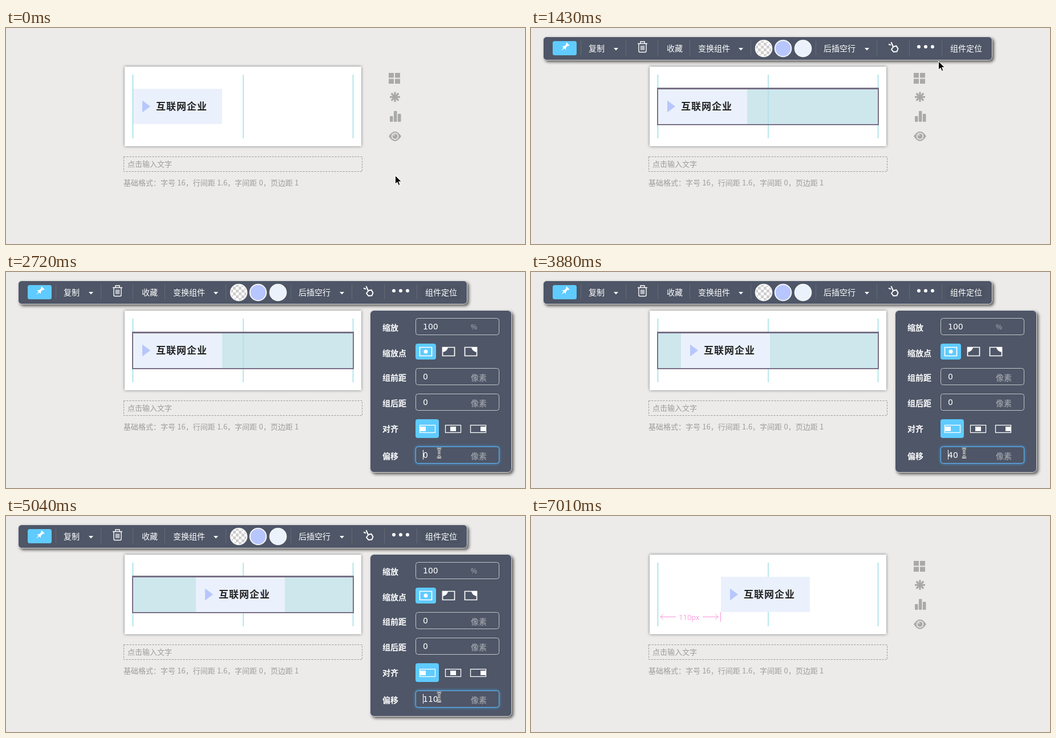
An HTML page that plays this animation: 910x380 px, repeating every 8 s.

```html
<!DOCTYPE html>
<html lang="zh-CN">
<head>
<meta charset="utf-8">
<title>组件定位</title>
<style>
@property --off { syntax: "<integer>"; inherits: true; initial-value: 0; }

html, body { margin: 0; width: 100%; height: 100%; overflow: hidden; background: #ecebe9; }
#stage { position: relative; width: 910px; height: 380px; overflow: hidden; animation: offset 8s step-end infinite; }
svg { position: absolute; left: 0; top: 0; }
text { font: 14px "Noto Sans CJK SC", "Noto Sans CJK", sans-serif; fill: #fff; }
.note text { font-size: 13px; fill: #9c9c9c; word-spacing: .4px; }
.title { font-size: 17px; font-weight: 700; letter-spacing: 1px; fill: #222; }
.labels text { font-weight: 700; }
.num, #value { font: 14px/20px "DejaVu Sans", sans-serif; color: #fff; }
.unit text { fill: #adb0b6; }
.dark { fill: #4e5667; stroke: #dcdcdc; filter: drop-shadow(3px 3px 2.5px rgba(0,0,0,.6)); }
.card { fill: #fff; filter: drop-shadow(0 0 2.5px rgba(50,50,60,.6)); }
.blue { fill: #5fcbff; }
.white { fill: #fff; }
.line { fill: none; stroke: #fff; }
.pink { fill: none; stroke: #f98fd6; }
.pink text { font: 300 13.5px Roboto, sans-serif; fill: #f77fd0; stroke: none; }

/* step-end keeps every change hard */
.bar, .panel, .hover, .select, .focus, .caret, .after, #value,
.cursor, .arrow, .hand, .beam, .locate { animation: 8s step-end infinite; }
.part { transform: translateX(calc(var(--off) * 1px)); }
#value { position: absolute; left: 731px; top: 312px; counter-reset: off var(--off); animation-name: panel; }
#value::before { content: counter(off); }
.bar, .select { animation-name: bar; }
.hover { animation-name: hover; }
.panel { animation-name: panel; }
.focus { animation-name: focus; filter: drop-shadow(0 0 2.5px #4aa8f0); }
.caret { animation-name: caret; }
.after { animation-name: after; }
.locate { animation-name: locate; }
.cursor { animation-name: move; }
.arrow { animation-name: arrow; }
.hand { animation-name: hand; }
.beam { animation-name: beam; }

@keyframes offset {
  0% { --off: 0; } 36.25% { --off: 10; } 41.875% { --off: 20; } 48.5% { --off: 40; }
  49.625% { --off: 50; } 50.75% { --off: 60; } 51.875% { --off: 70; } 52.875% { --off: 80; }
  57.375% { --off: 90; } 59.625% { --off: 100; } 63%, 100% { --off: 110; }
}
@keyframes bar { 0%, 87.625%, 100% { opacity: 0; } 15.625% { opacity: 1; } }
@keyframes hover { 0%, 87.625%, 100% { opacity: 0; } 10% { opacity: 1; } }
@keyframes panel { 0%, 87.625%, 100% { opacity: 0; } 21.125% { opacity: 1; } }
@keyframes focus { 0%, 100% { opacity: 0; } 32.875% { opacity: 1; } }
@keyframes caret { 0%, 36.25%, 69.625%, 80.875%, 100% { opacity: 0; } 34%, 48.5%, 75.25% { opacity: 1; } }
@keyframes after { 0%, 100% { opacity: 0; } 87.625% { opacity: 1; } }
@keyframes locate { 0%, 100% { fill: transparent; } 20% { fill: #37812f; } 27.75% { fill: #42633f; } 28.875% { fill: #4c5464; } }
@keyframes move {
  0% { transform: translate(682px, 259px); }
  6.75% { transform: translate(655px, 240px); }
  7.875% { transform: translate(590px, 205px); }
  9% { transform: translate(515px, 172px); }
  10% { transform: translate(460px, 148px); }
  11.125% { transform: translate(440px, 142px); }
  16.75% { transform: translate(600px, 92px); }
  17.875% { transform: translate(714px, 58px); }
  18.875% { transform: translate(738px, 46px); }
  20% { transform: translate(750px, 38px); }
  21.125% { transform: translate(752px, 40px); }
  22.25% { transform: translate(754px, 66px); }
  23.375% { transform: translate(757px, 118px); }
  24.375% { transform: translate(759px, 154px); }
  25.5% { transform: translate(761px, 192px); }
  26.625% { transform: translate(762px, 234px); }
  27.75% { transform: translate(761px, 270px); }
  28.875% { transform: translate(759px, 297px); }
  30% { transform: translate(760px, 313px); }
  31.125% { transform: translate(759.5px, 318px); }
  67.5% { transform: translate(750px, 319px); }
  68.625% { transform: translate(705px, 322px); }
  69.625% { transform: translate(590px, 325px); }
  70.75%, 100% { transform: translate(443px, 325px); }
}
@keyframes arrow { 0%, 69.625% { opacity: 1; } 20%, 71.875%, 100% { opacity: 0; } }
@keyframes hand { 0%, 30%, 100% { opacity: 0; } 20% { opacity: 1; } }
@keyframes beam { 0%, 69.625%, 100% { opacity: 0; } 30% { opacity: 1; } }
</style>
</head>
<body>
<div id="stage">
<svg width="910" height="380">
  <defs>
    <path id="drop" d="M-4 -2h8l-4 4.500z" fill="#fff"/>
    <path id="separator" d="M.500 22v26" stroke="#666b76"/>
    <rect id="field" width="146" height="29" x="718.500" rx="4" fill="none" stroke="#c3c5ca"/>
    <rect id="frame" width="27" height="13" y="269.500" fill="none" stroke="#fff" stroke-width="1.300"/>
    <rect id="block" width="10" height="8" y="272" fill="#fff"/>
    <path id="ibeam" d="M-3.500-7.500q3 0 3.500 2 .5-2 3.500-2M0-6V7M-3.500 8.500q3 0 3.500-2 .5 2 3.500 2M-2 3.500h4"/>
    <pattern id="check" width="10" height="10" x="403" y="31" patternUnits="userSpaceOnUse">
      <path fill="#fff" d="M0 0h10v10H0z"/>
      <path fill="#d0cdcd" d="M0 0h5v5H0zM5 5h5v5H5z"/>
    </pattern>
  </defs>

  <rect class="card" x="208" y="68" width="415" height="140"/>
  <g fill="#74d2da">
    <path d="M222 82h1v112h-1zM608 82h1v112h-1z"/>
    <path d="M415 82h2v112h-2z" opacity=".5"/>
  </g>
  <rect class="hover" x="223" y="107" width="386" height="62" fill="rgba(184,221,229,.7)"/>
  <g class="part">
    <path fill="#eaf1fc" d="M223 107h156v62H223z"/>
    <path fill="#b7c6fc" d="M239 127.500v21l14-10.500z"/>
    <text class="title" x="263" y="144">互联网企业</text>
  </g>
  <path class="select" fill="#786f85" fill-rule="evenodd" d="M221 105h389v66H221zM223 108h385v61H223z"/>

  <g class="after pink">
    <path d="M254 177.500h-27m5-5l-5 5 5 5M301 177.500h27m-5-5l5 5-5 5M332.500 169v17"/>
    <text x="259" y="183">110px</text>
  </g>

  <g class="note">
    <rect x="206.500" y="226.500" width="418" height="26" fill="none" stroke="#999" stroke-dasharray="3 2"/>
    <text x="213" y="244">点击输入文字</text>
    <text x="206" y="277">基础格式：字号 16，行间距 1.6，字间距 0，页边距 1</text>
  </g>

  <g fill="#a9a9a9">
    <path d="M671 79h9v8.500h-9zM682 79h9v8.500h-9zM671 89.500h9v8.500h-9zM682 89.500h9v8.500h-9z"/>
    <path d="M682 112.500v17.500M673 121.300h18M675.700 115l12.600 12.600M688.300 115l-12.600 12.600" stroke="#a9a9a9" stroke-width="3.200"/>
    <rect x="673" y="155" width="5.500" height="10" rx="1"/>
    <rect x="680" y="146" width="5.500" height="19" rx="1"/>
    <rect x="687" y="151" width="5.500" height="14" rx="1"/>
    <path d="M671 190.500q11-17 22 0q-11 17-22 0z"/>
    <circle cx="682" cy="190.500" r="6.200" fill="#ecebe9"/>
    <circle cx="682" cy="190.500" r="4.500"/>
    <path d="M679.500 190q0-2.500 2.500-2.500" fill="none" stroke="#ecebe9" stroke-width="1.200"/>
  </g>

  <g class="bar">
    <rect class="dark" x="21.500" y="15.500" width="787" height="41" rx="6"/>
    <rect class="blue" x="38" y="23" width="42" height="25" rx="3.500"/>
    <path class="white" transform="translate(59 34) rotate(45)" d="M-3.500-8.500h7v2H2V-1l2.500 3H.8L0 9-.8 2h-3.700L-2-1v-5.500h-1.500z"/>
    <use href="#separator" x="87"/>
    <use href="#separator" x="166"/>
    <use href="#separator" x="222"/>
    <use href="#separator" x="278"/>
    <use href="#separator" x="385"/>
    <use href="#separator" x="499"/>
    <use href="#separator" x="606"/>
    <use href="#separator" x="663"/>
    <use href="#separator" x="720"/>
    <rect class="locate" x="728" y="24" width="68" height="24" rx="4"/>
    <text x="101" y="41">复制</text>
    <text x="238" y="41">收藏</text>
    <text x="293" y="41">变换组件</text>
    <text x="513" y="41">后插空行</text>
    <text x="735" y="41">组件定位</text>
    <use href="#drop" x="149" y="37"/>
    <use href="#drop" x="368" y="37"/>
    <use href="#drop" x="589" y="37"/>
    <path class="line" stroke-width="1.400" d="M187 27.500h17M192 27v-3h7v3M189 28v12.500q0 2 2 2h9q2 0 2-2V28M193 31v8M195.500 31v8M198 31v8"/>
    <g stroke="#f4f4f4" stroke-width="2">
      <circle cx="408" cy="36" r="14.300" fill="url(#check)"/>
      <circle cx="442" cy="36" r="14.300" fill="#b7c6ff"/>
      <circle cx="477" cy="36" r="14.300" fill="#ebf2fc"/>
    </g>
    <path class="line" stroke="#e8e8ea" stroke-width="2" stroke-linejoin="round" d="M627 28.500l4 1.500M631.500 25l3.500 8 5.500-1.500 3 5-2 5-6 .5-3.500-4.500 3.500-4.500"/>
    <g class="white"><circle cx="680" cy="33" r="3"/><circle cx="692" cy="33" r="3"/><circle cx="704" cy="33" r="3"/></g>
  </g>

  <g class="panel">
    <rect class="dark" x="638.500" y="67.500" width="248" height="285" rx="7"/>
    <g class="labels">
      <text x="660" y="103">缩放</text>
      <text x="660" y="148">缩放点</text>
      <text x="660" y="191">组前距</text>
      <text x="660" y="236">组后距</text>
      <text x="660" y="281">对齐</text>
      <text x="660" y="329">偏移</text>
    </g>
    <use href="#field" y="81.500"/>
    <use href="#field" y="169.500"/>
    <use href="#field" y="214.500"/>
    <use href="#field" y="307.500"/>
    <rect class="focus" x="718.500" y="307.500" width="146" height="29" rx="4" fill="#4e5667" stroke="#62b5f0"/>
    <text class="num" x="731" y="101">100</text>
    <text class="num" x="731" y="189">0</text>
    <text class="num" x="731" y="234">0</text>
    <g class="unit">
      <text x="815" y="101" style="font-size:12px">%</text>
      <text x="815" y="191">像素</text>
      <text x="815" y="236">像素</text>
      <text x="815" y="329">像素</text>
    </g>
    <rect class="blue" x="718" y="126" width="36" height="28" rx="4"/>
    <rect class="blue" x="718" y="259" width="41" height="33" rx="4"/>
    <path class="line" stroke-width="1.700" d="M725.500 132.500h21v15h-21zM765.500 132.500h21v15h-21zM804.500 132.500h21v15h-21z"/>
    <circle class="white" cx="736" cy="140" r="3.500"/>
    <path class="white" d="M765 132h10a10 9 0 0 1-10 9zM826 132h-10a10 9 0 0 0 10 9z"/>
    <use href="#frame" x="725.500"/><use href="#block" x="726"/>
    <use href="#frame" x="770.500"/><use href="#block" x="779"/>
    <use href="#frame" x="814.500"/><use href="#block" x="832"/>
    <path class="caret" fill="#fff" d="M731 313h1v17h-1z"/>
  </g>
</svg>

<div id="value"></div>

<svg width="910" height="380">
  <g class="cursor">
    <path class="arrow" d="M.5.500v15l3.500-3.200 2.400 5.400 2.500-1.100-2.400-5.300h4.800z" fill="#000" stroke="#fff"/>
    <path class="hand" transform="rotate(-8 7 8)" d="M2.500 1.500a1.500 1.500 0 0 1 3 0V6l6 1.200q2 .5 2 2.300 0 3-1.500 5V16H5v-1.500L.6 9.600Q0 8 1.500 8l2 1.500zM7.500 10.500v3M9.700 10.500v3" fill="#fff" stroke="#111"/>
    <g class="beam" fill="none">
      <use href="#ibeam" stroke="#fff" stroke-width="3.200"/>
      <use href="#ibeam" stroke="#222"/>
    </g>
  </g>
</svg>
</div>
</body>
</html>
```
